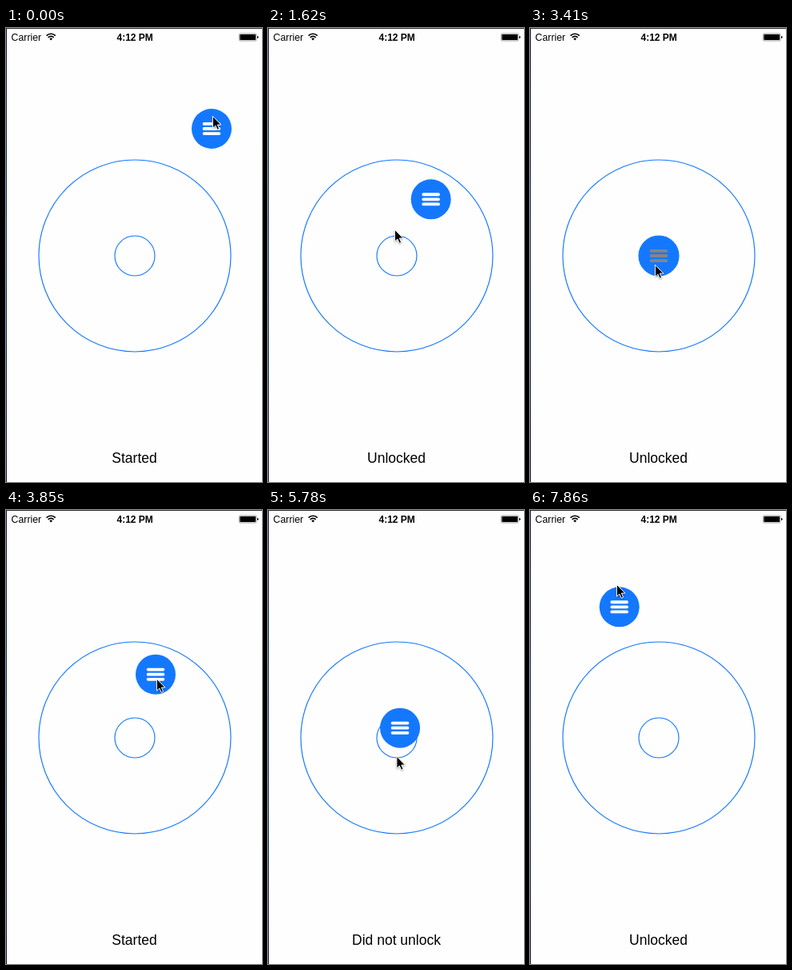
Write an HTML page that moves like this. It is 320x568 px and loops after 8 s.

```html
<!DOCTYPE html>
<html lang="en">
<head>
<meta charset="utf-8">
<title>Drag to unlock</title>
<style>
  html, body { margin: 0; width: 100%; height: 100%; overflow: hidden; background: #fefefe; }
  svg { display: block; width: 320px; height: 568px; }
  text { font-family: "Liberation Sans", Arial, sans-serif; font-size: 12px; }
  .ring { fill: none; stroke: #1478ff; stroke-width: 1.15; }
  #label { font-size: 17.5px; text-anchor: middle; }
  #time { font-weight: bold; text-anchor: middle; }
  #bars { stroke: #fff; stroke-width: 3.8; stroke-linecap: round; }
  #bars.pressed { stroke: #858589; }
  #cursor { filter: drop-shadow(0 1px 1px #0005); }
</style>
</head>
<body>
<svg viewBox="0 0 320 568">
  <defs>
    <linearGradient id="edge" x2="0" y2="1">
      <stop offset="0" stop-color="#101c30"/>
      <stop offset=".5" stop-color="#1d355e"/>
      <stop offset="1" stop-color="#0e1a30"/>
    </linearGradient>
  </defs>
  <rect width="320" height="568" fill="#fefefe"/>
  <rect width="320" height="1" fill="#2a2c30"/>
  <rect width="1" height="568" fill="url(#edge)"/>

  <text x="6.6" y="15.5" style="font-size:12.3px">Carrier</text>
  <g fill="none" stroke="#000" stroke-width="1.7">
    <path d="M50.6 9.6a7.8 7.8 0 0 1 11.2 0M52.7 11.9a4.9 4.9 0 0 1 7 0"/>
    <path d="M54.3 13.4a2.6 2.6 0 0 1 3.8 0L56.2 15.4z" fill="#000" stroke="none"/>
  </g>
  <text id="time" x="161.2" y="15.5">4:12 PM</text>
  <rect x="291.5" y="7" width="21.5" height="9" rx="1.5" fill="none" stroke="#555" stroke-width=".6"/>
  <rect x="292.4" y="7.9" width="19.7" height="7.2" rx=".8"/>
  <path d="M314 10q1.6 .3 1.6 1.5t-1.6 1.5z"/>

  <circle class="ring" cx="161" cy="285" r="120"/>
  <circle class="ring" cx="161" cy="285" r="25"/>
  <text id="label" x="160.5" y="544"></text>

  <g id="button">
    <circle r="25" fill="#1478ff"/>
    <path id="bars" d="M-9.4 -6.1H9.4M-9.4 0H9.4M-9.4 6.1H9.4"/>
  </g>
  <path id="cursor" d="M.4 .2V15.2L3.8 12 6.2 17.3 8.6 16.2 6.3 11.1H10.9Z" stroke="#fff" stroke-linejoin="round"/>
</svg>
<script>
const LOOP = 8000;
const REFRESH = LOOP / 54;
const HOME = { x: 161, y: 285 };
const $ = id => document.getElementById(id);
const button = $('button'), bars = $('bars'), cursor = $('cursor'), label = $('label');
const at = (x, y) => ({ x, y });

// The cursor presses, holds the button at drop, then moves off to rest.
const GESTURES = [
  { grab: -1000, release: 565, press: HOME, drop: at(257, 126), hold: at(258, 110), rest: at(158, 252), result: 'Unlocked' },
  { grab: 3440, release: 4325, press: at(156, 296), drop: at(187, 205.7), hold: at(188, 211), rest: at(160.5, 308), result: 'Did not unlock' },
  { grab: 7000, release: 7480, press: at(160.3, 258.5), drop: at(108, 109), hold: at(108, 93), rest: at(108, 93), result: 'Unlocked' }
];

// cubic-bezier(.42, 0, .58, 1), solved with Newton's method
function easeInOut(p) {
  let s = p;
  for (let i = 0; i < 5; i++) {
    const r = 1 - s;
    const x = 1.26 * s * r * r + 1.74 * s * s * r + s ** 3;
    s -= (x - p) / (1.26 * r * r + 0.96 * s * r + 1.26 * s * s);
  }
  return s * s * (3 - 2 * s);
}

function glide(from, to, elapsed, duration) {
  const k = easeInOut(Math.min(1, Math.max(0, elapsed / duration)));
  return at(from.x + (to.x - from.x) * k, from.y + (to.y - from.y) * k);
}

function place(node, { x, y }) {
  node.setAttribute('transform', `translate(${x.toFixed(2)} ${y.toFixed(2)})`);
}

function draw(now) {
  // The screen refreshes in coarse steps.
  const t = Math.floor((now % LOOP + 10) / REFRESH) * REFRESH;
  let knob = HOME, hand = HOME, text = '', pressed = false;

  for (const { grab, release, press, drop, hold, rest, result } of GESTURES) {
    knob = glide(knob, drop, t - grab, 400);
    knob = glide(knob, HOME, t - release, 2000);

    hand = glide(hand, press, t - grab + 900, 600);
    hand = glide(hand, hold, t - grab, 400);
    hand = glide(hand, rest, t - release - 450, 600);

    if (t >= grab) text = t < release ? 'Started' : result;
    pressed ||= t < grab && t >= grab - 100;
  }

  place(button, knob);
  place(cursor, hand);
  label.textContent = text;
  bars.classList.toggle('pressed', pressed);
}

const start = performance.now();
function tick() {
  draw(performance.now() - start);
  requestAnimationFrame(tick);
}
tick();
</script>
</body>
</html>
```
